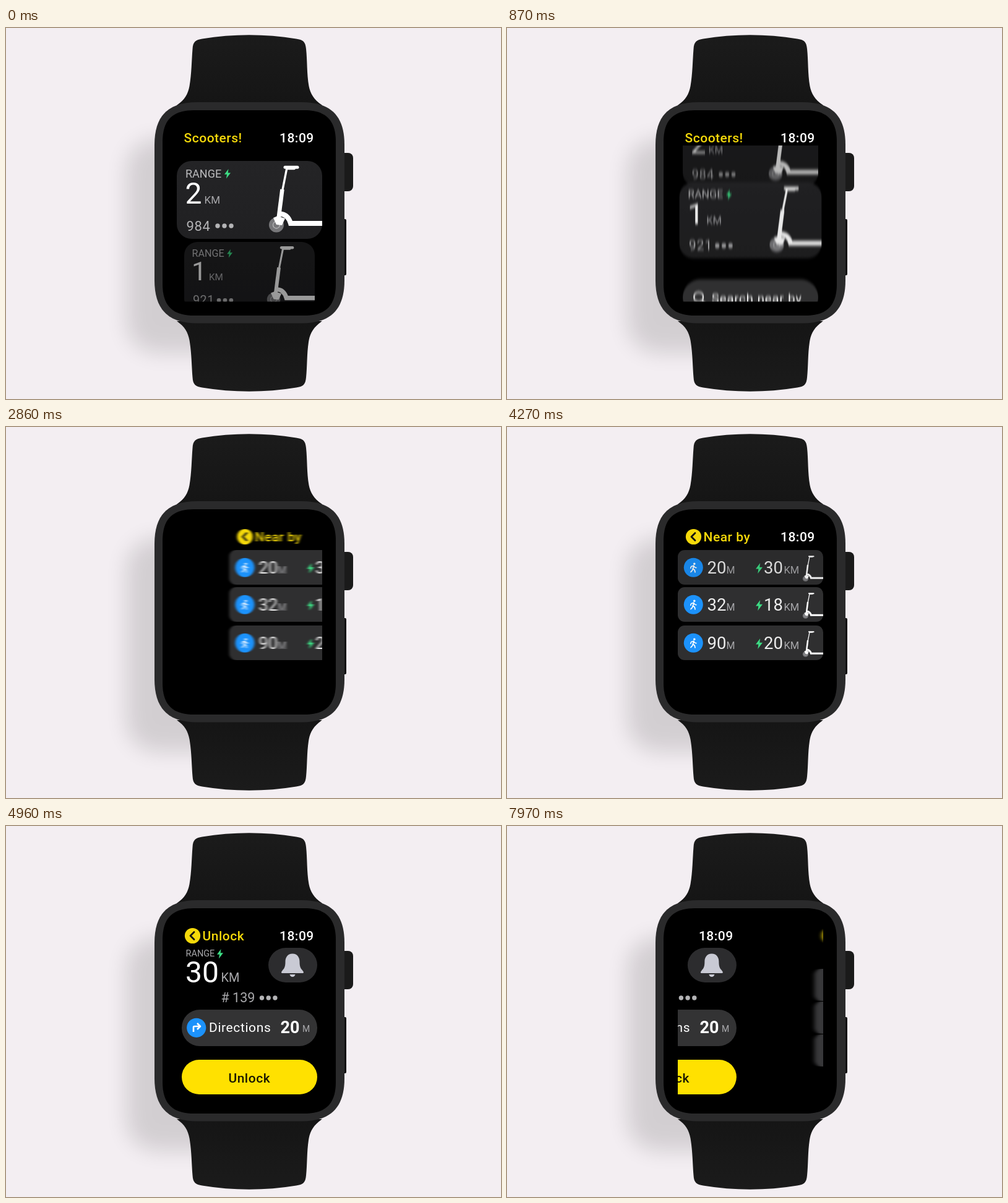
These frames come from a looping animation (800 by 600 pixels, 8 s). An HTML page:

```html
<!DOCTYPE html>
<html lang="en">
<head>
<meta charset="utf-8">
<title>Scooter watch app</title>
<style>
  html, body { margin: 0; width: 100%; height: 100%; overflow: hidden; background: #f3eef2; }
  svg { display: block; width: 800px; height: 600px; font-family: Roboto, Inter, sans-serif; }
  filter { color-interpolation-filters: sRGB; }
</style>
</head>
<body>
<svg id="stage" viewBox="0 0 800 600"></svg>
<script>
const YELLOW = '#f5d90a', BLUE = '#1c92fb', GREEN = '#3ddc84', GRAY = '#a9a9ac';
const LOOP = 8000, STEP = 30, PAGE_GAP = 353;

// ---------- drawing helpers ----------
const text = (x, y, size, str, color = '#fff', extra = '') =>
  `<text x="${x}" y="${y}" font-size="${size}" fill="${color}" ${extra}>${str}</text>`;
const box = (x, y, w, h, r, color, extra = '') =>
  `<rect x="${x}" y="${y}" width="${w}" height="${h}" rx="${r}" fill="${color}" ${extra}/>`;
const disc = (x, y, r, color) => `<circle cx="${x}" cy="${y}" r="${r}" fill="${color}"/>`;
const line = (d, color, width, extra = '') =>
  `<path d="${d}" fill="none" stroke="${color}" stroke-width="${width}" ${extra}/>`;
const dots = (x, y, pitch) =>
  [0, 1, 2].map(i => disc(x + i * pitch, y, 3.7, '#b4b4b6')).join('');
const bolt = (x, y, scale = 1) =>
  `<path transform="translate(${x} ${y}) scale(${scale})" fill="${GREEN}" d="M6.5 0L0 8.7H4L3 15.5L10 6.2H5.7Z"/>`;
const spaced = 'letter-spacing=".6"';
const medium = 'font-weight="500" letter-spacing=".5"';
const end = 'text-anchor="end"';

const scooter = `
  ${disc(437, 318.5, 12, '#77777a')}
  <circle cx="437" cy="318.5" r="5.5" fill="none" stroke="#b5b5b7" stroke-width="1.3"/>
  ${line('M443 300.5C454 301 458 309 460 316H511', '#fff', 8)}
  <path fill="#fff" d="M432 307L439 304L451 308L446 319L437 318Z"/>
  ${line('M454 226L446.5 264', '#fff', 3.4)}
  ${line('M446.5 261L440.5 308', '#fff', 6.5)}
  ${line('M451 225.3H471', '#fff', 5, 'stroke-linecap="round"')}
  ${line('M455 227.5H466', '#fff', 3.5, 'stroke-linecap="round"')}`;

const header = (title, back) => (back
  ? disc(301.5, 177.5, 12.6, YELLOW) + line('M304 171.5L298 177.5L304 183.5', '#111', 2.8, 'stroke-linecap="round" stroke-linejoin="round"')
  : '') + text(back ? 317.5 : 287.5, 185, 21, title, YELLOW, medium)
  + text(442, 185, 21, '18:09', '#fff', medium);

const card = (id, range, code, dotX) => `<g id="${id}">
  ${box(276, 215, 235, 126, 24, 'url(#cardFill)')}
  ${text(290, 241.5, 18, 'RANGE', '#bcbcbe')}${bolt(353, 228)}
  ${text(289.5, 284, 48, range)}
  ${text(320.5, 284, 17, 'KM', GRAY)}
  ${text(291.5, 327.5, 22, code, '#b4b4b6', spaced)}${dots(dotX, 320, 11)}
  ${scooter}</g>`;

const walker = (x, y) => `<g transform="translate(${x} ${y})">${disc(1.8, -6, 1.7, '#fff')}
  ${line('M.8 -3L-.5 2L2.2 4L3 7.5M-.5 1.5L-1.5 4.5L-4 7.2M-4.2 1L-3.2 -1.8L.5 -3L2.5 -.3L4.8 .3', '#fff', 1.7, 'stroke-linecap="round" stroke-linejoin="round"')}</g>`;

const row = (y, metres, km) => `<g id="row${metres}">
  ${box(276, y, 235, 56, 11, '#2f2f30')}
  ${disc(301.3, y + 28.3, 15.5, BLUE)}${walker(301, y + 28.3)}
  ${text(354.5, y + 38.3, 27.5, metres, '#ededed', end)}
  ${text(354.5, y + 38.3, 16, 'M', GRAY)}
  ${bolt(402, y + 21, 1.1)}
  ${text(446, y + 38.3, 27.5, km, '#ededed', end)}
  ${text(447.5, y + 38.3, 16.5, 'KM', GRAY)}
  <g transform="translate(511 ${y + 9}) scale(.385) translate(-511 -222)">${scooter}</g></g>`;

const listPage = header('Scooters!') + `<g clip-path="url(#listClip)"><g id="list">
  ${card('first', 2, 984, 342)}${card('second', 1, 921, 338.5)}
  <g id="search">${box(284, 380, 219, 58.5, 29, '#303031')}
    <circle cx="309.7" cy="408.7" r="7.6" fill="none" stroke="#fff" stroke-width="2"/>
    ${line('M315 414.5L321 421', '#fff', 2.4, 'stroke-linecap="round"')}
    ${text(330.5, 418, 21, 'Search near by', '#fff', spaced)}</g></g></g>`;

const nearbyPage = header('Near by', true) + row(199, 20, 30) + row(259, 32, 18) + row(321, 90, 20);

const unlockPage = header('Unlock', true)
  + text(290.5, 211, 14.5, 'RANGE', GRAY) + bolt(341, 199)
  + text(290, 253, 48, 30) + text(347.5, 251.5, 20, 'KM', GRAY)
  + box(424, 197, 79, 56, 28, '#2c2c2e')
  + `<path fill="#c9cad4" d="M463 206.5C455 206.5 451.5 213 451.5 219C451.5 229 449.5 230 446.5 234C444 237 445 238 447 238H479C481 238 482 237 479.500 234C476.500 230 474.500 229 474.500 219C474.500 213 471 206.500 463 206.500ZM458.500 240H467.500Q466.500 244 463 244T458.500 240Z"/>`
  + text(347.5, 285, 21.5, '# 139', GRAY) + dots(413.5, 278, 10.7)
  + box(284, 297, 219, 59, 29, '#333334') + disc(307.7, 326.3, 15.6, BLUE)
  + line('M303 333V325.500Q303 324 304.500 324H312M309 319L314 324L309 329', '#fff', 2.6, 'stroke-linejoin="round"')
  + text(328, 333, 21, 'Directions', '#fff', spaced)
  + text(443.5, 335, 27, 20, '#fff', 'font-weight="700"') + text(479, 333, 14, 'M', GRAY)
  + `<g id="unlockButton">${box(284, 378, 219, 56, 28, '#ffe100')}
     ${text(393.3, 414.5, 21, 'Unlock', '#1a1700', medium + ' text-anchor="middle"')}</g>`;

const nextPage = header('Near by', true)
  + [231, 284, 337].map(y => box(276, y, 235, 52, 11, '#38383a')).join('');

const pageIds = ['listPage', 'nearbyPage', 'unlockPage', 'nextPage'];
const pages = [listPage, nearbyPage, unlockPage, nextPage]
  .map((content, i) => `<g id="${pageIds[i]}">${content}</g>`).join('');

const strap = `<path fill="url(#strapFill)" d="M276 125C289 116 294 107 296.500 94C300 74 300 52 301.500 34C302 22 307 19 317 17.500Q393 5 469 17.500C480 19 484 22 485 34C487 52 486 74 489.500 94C492 107 498 116 511 125Z"/>`;

document.getElementById('stage').innerHTML = `
  <defs>
    <linearGradient id="strapFill" x1="0" y1="0" x2="0" y2="1">
      <stop offset="0" stop-color="#1b1b1b"/><stop offset="1" stop-color="#151515"/></linearGradient>
    <linearGradient id="cardFill" x1="0" y1="0" x2="0" y2="1">
      <stop offset="0" stop-color="#242426"/><stop offset="1" stop-color="#202022"/></linearGradient>
    <filter id="soft" x="-50%" y="-50%" width="200%" height="200%"><feGaussianBlur stdDeviation="17"/></filter>
    <filter id="blurX"><feGaussianBlur/></filter>
    <filter id="blurY"><feGaussianBlur/></filter>
    <clipPath id="pageClip"><rect x="276" y="140" width="235" height="320"/></clipPath>
    <clipPath id="listClip"><rect x="276" y="190" width="235" height="252.5"/></clipPath>
  </defs>
  <rect width="800" height="600" fill="#f3eef2"/>
  ${box(195, 180, 200, 345, 50, '#000', 'opacity=".13" filter="url(#soft)"')}
  ${strap}<g transform="matrix(1 0 0 -1 0 599)">${strap}</g>
  ${box(543, 309, 7, 91, 2, '#111')}
  ${box(538, 202, 23, 62, 8, '#1a1a1a')}
  <path fill="#2a2a2b" d="M309 120H478C525 120 547 142 547 189V408C547 455 525 477.500 478 477.500H309C262 477.500 240 455 240 408V189C240 142 262 120 309 120Z"/>
  <path d="M304 133H482C517 133 533 149 533 184V414C533 449 517 465 482 465H304C269 465 253 449 253 414V184C253 149 269 133 304 133Z"/>
  <g clip-path="url(#pageClip)">${pages}</g>`;

// ---------- motion ----------
const $ = id => document.getElementById(id);
const clamp = v => Math.min(1, Math.max(0, v));
const mix = (a, b, p) => a + (b - a) * p;
const smooth = v => v * v * (3 - 2 * v);
const ease = (v, power) => smooth(v ** power);
const stepsSince = (t, first) => Math.floor((t - first) / STEP) + 1;
const progress = (t, first, count) => clamp(stepsSince(t, first) / count);

function pressOpacity(t, first) {
  const k = stepsSince(t, first);
  return 1 - 0.5 * smooth(clamp(Math.min(k, 10 - k) / 4));
}

function setBlur(id, filterId, amount, vertical) {
  if (amount < 0.05) return $(id).removeAttribute('filter');
  $(filterId).firstElementChild.setAttribute('stdDeviation', vertical ? `0 ${amount}` : `${amount} 0`);
  $(id).setAttribute('filter', `url(#${filterId})`);
}

function placeCard(id, top, focus) {
  const scale = mix(0.898, 1, focus);
  $(id).setAttribute('transform', `translate(393.5 ${top}) scale(${scale}) translate(-393.5 -215)`);
  $(id).setAttribute('opacity', mix(0.6, 1, focus));
}

function render(t) {
  const scroll = progress(t, 510, 17);
  const leaving = ease(scroll, 1.8), arriving = ease(scroll, 1.35);
  placeCard('first', mix(215, 102, leaving), 1 - leaving);
  placeCard('second', mix(346, 222, arriving), arriving);
  $('search').setAttribute('transform', `translate(0 ${mix(120, 0, arriving)})`);
  setBlur('list', 'blurY', 4 * Math.sin(Math.PI * scroll), true);

  $('search').setAttribute('opacity', pressOpacity(t, 2380));
  $('row20').setAttribute('opacity', pressOpacity(t, 4270));
  $('unlockButton').setAttribute('opacity', pressOpacity(t, 7460));

  const slides = [2650, 4690, 7820].map(first => progress(t, first, 10));
  const position = slides.reduce((sum, s) => sum + ease(s, 1.72), 0);
  pageIds.forEach((id, i) => {
    const offset = i - position;
    $(id).style.display = Math.abs(offset) < 1 ? '' : 'none';
    $(id).setAttribute('transform', `translate(${offset * PAGE_GAP} 0)`);
    if (i) setBlur(id, 'blurX', offset > 0 && offset < 1 ? 4 * Math.sin(Math.PI * slides[i - 1]) : 0);
  });
}

const start = performance.now();
function tick() {
  render((performance.now() - start) % LOOP);
  requestAnimationFrame(tick);
}
tick();
</script>
</body>
</html>
```
